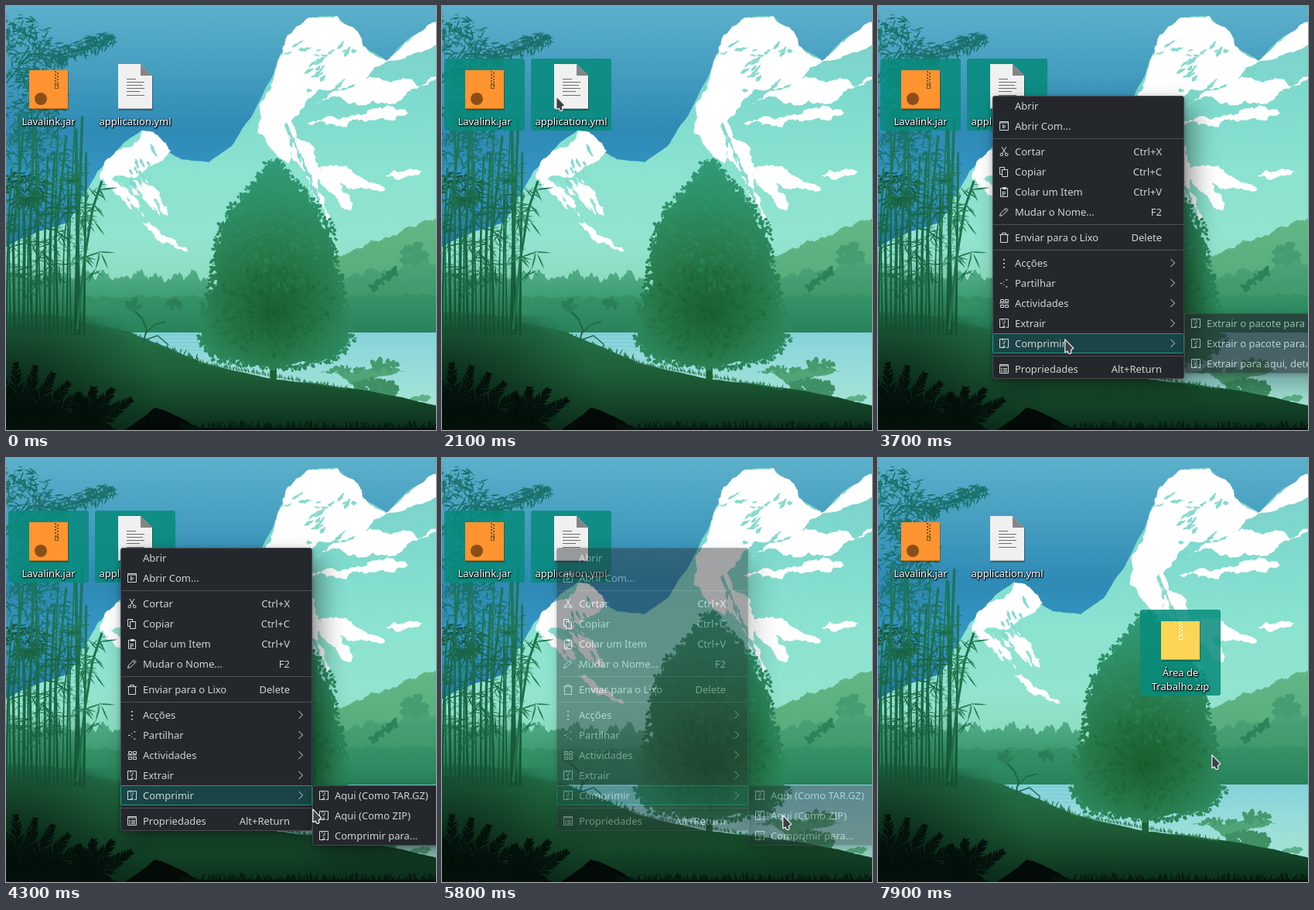
Animation, 556 px wide and 548 px high, one loop 8000 ms. Source, as an HTML page with a canvas:

```html
<!DOCTYPE html>
<html lang="pt">
<head>
<meta charset="utf-8">
<title>Desktop</title>
<style>
html, body { margin: 0; width: 100%; height: 100%; overflow: hidden; background: #10402a; }
#stage { position: absolute; left: 0; top: 0; width: 556px; height: 548px; overflow: hidden;
  font: 13px/18px "Noto Sans", "Open Sans", sans-serif; }
#stage * { position: absolute; box-sizing: border-box; white-space: pre; }
#stage svg * { position: static; }
canvas, svg, #zip, #menus { left: 0; top: 0; }
.sel { width: 104px; height: 93px; background: rgba(7, 139, 124, .86); border-radius: 3px; }
.label { width: 120px; text-align: center; color: #fff;
  text-shadow: 1px 1px 1px #000, 0 1px 2px #000, 0 0 3px rgba(0,0,0,.6); }
#band { background: rgba(20, 155, 138, .3); border: 1px solid #18a090; }
.menu { background: #24282d; border: 1px solid #454a4e; border-radius: 3px; color: #d0d3d5;
  box-shadow: 12px 16px 32px rgba(0,0,0,.42), 0 2px 6px rgba(0,0,0,.3); }
.row { left: -1px; right: -1px; height: 26px; border: 1px solid transparent; border-radius: 3px; }
.row.on { background: #1a4445; border-color: #1c9a8b; }
.row span { left: 28px; top: 3px; }
.row .key { left: auto; right: 28px; }
.row svg { left: 6px; top: 4px; }
.row .more { left: auto; right: 6px; }
.rule { left: 0; right: 0; height: 1px; background: #4c5155; }
</style>
</head>
<body>
<div id="stage">
  <canvas id="view" width="556" height="548"></canvas>
  <div class="sel" id="selA" style="left:3px;top:68px"></div>
  <div class="sel" id="selB" style="left:115px;top:68px"></div>
  <svg width="556" height="548">
    <rect x="31" y="84" width="50" height="51" opacity=".25"/>
    <rect x="30" y="83" width="50" height="50" fill="#ff9430"/>
    <path d="M30 132.5h50" stroke="#c9701c"/>
    <path d="M64 84v18M67 86v18" stroke="#80501f" stroke-width="2" stroke-dasharray="2 2"/>
    <rect x="63.5" y="101.5" width="4" height="5" fill="none" stroke="#80501f"/>
    <circle cx="45" cy="120" r="8" fill="#8a4f19"/>
    <path d="M146 76h29l15 15v44h-44z" opacity=".3"/>
    <path d="M145 75h29l15 15v43h-44z" fill="#f0f0f0"/>
    <path d="M174 75l15 15h-15z" fill="#858585"/>
    <path d="M145 132.5h44" stroke="#b9b9b9"/>
    <path d="M156 94.5h12m-12 4h23m-23 4h21m-21 4h23m-23 4h17m-17 5h23" stroke="#6d6d6d"/>
  </svg>
  <div class="label" style="left:-5px;top:140px">Lavalink.jar</div>
  <div class="label" style="left:107px;top:140px">application.yml</div>
  <div id="zip">
    <div class="sel" style="left:339px;top:196px;height:111px"></div>
    <svg width="556" height="548">
      <rect x="367" y="212" width="50" height="51" opacity=".25"/>
      <rect x="366" y="211" width="50" height="50" fill="#fcd557"/>
      <path d="M366 260.5h50" stroke="#cba53c"/>
      <path d="M390 212v18M393 214v16" stroke="#fff6d8" stroke-width="2" stroke-dasharray="2 2"/>
      <rect x="389.5" y="229.5" width="4" height="5" fill="none" stroke="#fff6d8"/>
    </svg>
    <div class="label" style="left:331px;top:268px">Área de
Trabalho.zip</div>
  </div>
  <div id="band"></div>
  <div id="menus"></div>
  <svg id="cursor" width="16" height="24">
    <path d="M.8.8V17.6L4.3 16.2Q5 20.3 8 19.2Q9.6 18.2 8.3 14.8L11.8 12.2Z"
      fill="#3b4146" stroke="#f4f4f4" stroke-width="1.2" stroke-linejoin="round"/>
  </svg>
</div>
<script>
const $ = id => document.getElementById(id);
const c = $('view').getContext('2d');

// ---------- drawing helpers ----------
let seed = 11;
const rnd = () => (seed = (seed * 16807) % 2147483647) / 2147483647;
const span = (a, b) => a + (b - a) * rnd();
const times = (n, f) => { for (let i = 0; i < n; i++) f(i); };

function grad(y0, y1, ...cols) {
  const g = c.createLinearGradient(0, y0, 0, y1);
  cols.forEach((k, i) => g.addColorStop(i / (cols.length - 1), k));
  return g;
}

// Fractal edge between two points
function edge(x0, y0, x1, y1, amp) {
  const dx = x1 - x0, dy = y1 - y0;
  if (Math.hypot(dx, dy) < 3.5) return c.lineTo(x1, y1);
  const k = span(-amp, amp), mx = (x0 + x1) / 2 - dy * k, my = (y0 + y1) / 2 + dx * k;
  edge(x0, y0, mx, my, amp);
  edge(mx, my, x1, y1, amp);
}

function shape(p, color, amp = .03) {
  c.fillStyle = color;
  c.beginPath();
  c.moveTo(p[0], p[1]);
  for (let i = 2; i < p.length; i += 2) edge(p[i - 2], p[i - 1], p[i], p[i + 1], amp);
  edge(p[p.length - 2], p[p.length - 1], p[0], p[1], amp);
  c.fill();
}

// Ragged sliver from one point to another
function shard(x0, y0, x1, y1, w, color = '#fff') {
  const d = Math.hypot(x1 - x0, y1 - y0), nx = (y0 - y1) / d * w, ny = (x1 - x0) / d * w;
  const at = (k, s) => [x0 + (x1 - x0) * k + nx * s, y0 + (y1 - y0) * k + ny * s];
  shape([x0, y0, ...at(.3, 1), ...at(.7, .6), x1, y1, ...at(.6, -.6), ...at(.25, -.9)], color, .22);
}

// Tree line between two heights, filled down to a floor
function ridge(x0, y0, x1, y1, floor, color, bump) {
  c.fillStyle = color;
  c.beginPath();
  c.moveTo(x0, floor);
  for (let x = x0; x <= x1; x += 2) {
    const crown = Math.abs(Math.sin(x * .19) + Math.sin(x * .083)) / 2;
    c.lineTo(x, y0 + (y1 - y0) * (x - x0) / (x1 - x0) - bump * (crown + rnd() * .45));
  }
  c.lineTo(x1, floor);
  c.fill();
}

function leaf(x, y, a, len, w) {
  c.save();
  c.translate(x, y);
  c.rotate(a);
  c.beginPath();
  c.moveTo(0, 0);
  c.quadraticCurveTo(len * .4, -w, len, 0);
  c.quadraticCurveTo(len * .4, w, 0, 0);
  c.fill();
  c.restore();
}

// Scatter inside an ellipse: round leaves, or blades when long > 0
function clump(n, x, y, rx, ry, size, color, long = 0) {
  c.fillStyle = color;
  times(n, () => {
    const a = span(0, 6.283), r = Math.sqrt(rnd()), s = span(.5, 1.4) * size;
    const u = x + Math.cos(a) * r * rx, v = y + Math.sin(a) * r * ry;
    if (long) return leaf(u, v, span(-.3, 3.4), s * long, s * .5);
    c.beginPath();
    c.ellipse(u, v, s, s * .65, a, 0, 7);
    c.fill();
  });
}

function line(color, w, ...p) {
  c.strokeStyle = color;
  c.lineWidth = w;
  c.beginPath();
  for (let i = 0; i < p.length; i += 2) c.lineTo(p[i], p[i + 1]);
  c.stroke();
}

function grass(x0, x1, ground, color, h) {
  c.fillStyle = color;
  for (let x = x0; x < x1; x += 1.8) leaf(x, ground(x), -1.57 + span(-.6, .6), span(h / 3, h), 1.5);
}

// ---------- landscape ----------
function sky() {
  c.fillStyle = grad(0, 320, '#5cb0cb', '#469ec0', '#2f8ab5', '#3598c8', '#1c70b2');
  c.fillRect(0, 0, 556, 340);
}

function mountains() {
  const mint = grad(20, 400, '#7ccfcb', '#7edacd', '#8ae2d0', '#92e4cf', '#86d6b4'), rock = '#86dacd';
  shape([-20, 322, 80, 280, 118, 214, 152, 177, 176, 160, 226, 198, 262, 202, 292, 181, 318, 142, 344, 92, 368, 36,
    404, 13, 428, 13, 462, 52, 492, 71, 526, 38, 580, 5, 580, 430, -20, 430], mint, .04);

  shape([372, 31, 404, 15, 428, 13, 462, 52, 492, 72, 466, 93, 440, 106, 404, 108, 386, 130, 368, 150, 376, 180, 366, 205,
    340, 181, 326, 164, 345, 96, 358, 62], '#fff', .16);
  shape([490, 72, 526, 40, 570, 12, 570, 40, 524, 63], '#fff', .12);
  shard(400, 128, 575, 88, 13);
  shard(385, 152, 520, 138, 7);
  shard(366, 148, 418, 278, 14);
  shard(400, 207, 490, 238, 11);
  shard(405, 210, 446, 264, 10);
  shard(491, 219, 538, 214, 7);
  times(22, () => {
    const x = span(358, 446), y = span(50, 118);
    shard(x, y, x + span(6, 20), y - span(-2, 16), span(1, 3), rock);
  });
  times(12, i => {
    const x = 362 + i * 3.5, y = 150 + i * 8;
    shard(x, y, x + span(4, 9), y + span(14, 26), span(1, 3), rock);
  });

  shape([176, 161, 213, 187, 190, 206, 166, 222, 121, 224, 140, 192], '#fff', .16);
  times(8, i => {
    const x = 124 + i * 8, y = span(212, 238);
    shard(x, y, x + span(22, 46), y + span(26, 52), span(3, 6));
  });
  shard(176, 280, 236, 317, 5);
  times(12, () => {
    const x = span(140, 188), y = span(176, 226);
    shard(x, y, x + span(4, 10), y + span(8, 18), 2, rock);
  });
}

function hills() {
  ridge(410, 334, 558, 276, 430, grad(280, 400, '#62b685', '#52a878'), 5);
  clump(80, 530, 324, 18, 16, 4, '#469d72');
  ridge(0, 355, 262, 358, 430, grad(340, 425, '#52ae88', '#3b9a70', '#2a875c'), 13);
  ridge(400, 360, 558, 336, 430, grad(335, 428, '#4aa276', '#3d9869', '#2c8655'), 9);
  ridge(100, 379, 558, 376, 425, grad(370, 425, '#379468', '#27825a'), 4);
  c.fillStyle = grad(420, 515, '#84d2da', '#97dcda', '#a4e4d4');
  c.fillRect(140, 422, 416, 100);
  c.fillStyle = 'rgba(105,190,200,.4)';
  times(5, i => c.fillRect(165 + i * 17 % 40, 424 + i * 5, 80, 1.5));
  shard(405, 474, 516, 473, 8, '#4fa577');
  clump(40, 488, 464, 18, 7, 3, '#459a6e');
  clump(30, 442, 470, 22, 4, 3, '#479c70');
  shard(492, 511, 550, 506, 5, '#5eb08a');
  clump(140, 478, 496, 28, 14, 4, '#3f9065');
}

function ground() {
  shape([-20, 396, 60, 398, 160, 421, 255, 461, 345, 482, 460, 496, 580, 520, 580, 570, -20, 570],
    grad(395, 545, '#237050', '#236c42', '#1f6039', '#164a2b', '#0c301c'), .02);
  const shade = c.createRadialGradient(0, 548, 20, 0, 548, 210);
  shade.addColorStop(0, 'rgba(2,16,9,.9)');
  shade.addColorStop(1, 'rgba(8,40,24,0)');
  c.fillStyle = shade;
  c.fillRect(0, 400, 220, 148);
  grass(90, 250, x => 406 + (x - 90) * .34, '#247049', 12);
  grass(250, 440, x => 463 + (x - 250) * .18, '#2a7a4c', 9);
}

function bigTree() {
  const tint = c.createRadialGradient(345, 395, 10, 345, 365, 175);
  ['#1c6233', '#237242', '#2a8356', '#2f926a', '#339c7c'].forEach((k, i) => tint.addColorStop(i / 4, k));
  shape([341, 440, 351, 440, 350, 485, 341, 485], '#1c6034');
  // half width of the crown at each height
  const crown = [[206, 4], [232, 26], [262, 52], [292, 70], [340, 76], [385, 86], [430, 96], [456, 72], [464, 20]];
  const side = s => crown.map(([y, w]) => [348 + s * w, y]);
  const rim = [...side(1), ...side(-1).reverse()];
  shape(rim.flat(), tint, .13);
  rim.forEach(([x, y], i) => {
    const [u, v] = rim[(i + 1) % rim.length];
    times(4, j => clump(16, x + (u - x) * j / 4, y + (v - y) * j / 4, span(6, 12), span(4, 9), 2.4, tint));
  });
  clump(220, 345, 300, 62, 72, 3, 'rgba(56,166,122,.15)');
  clump(260, 345, 395, 82, 60, 3, 'rgba(15,80,42,.15)');
  clump(30, 428, 356, 9, 14, 3, '#2b8459');
  times(4, i => clump(10, 476 + i * 8, 362 - i * 6, 6, 5, 3, '#2b8459'));
}

function bamboo() {
  const g = grad(20, 420, '#19706a', '#1c7463', '#1f7555', '#186645', '#134e2d');
  c.fillStyle = grad(330, 425, 'rgba(28,98,62,0)', 'rgba(28,98,62,.8)');
  c.fillRect(0, 330, 100, 80);
  clump(900, 40, 260, 66, 120, 3, 'rgba(36,128,94,.5)', 3);
  times(12, i => clump(70, span(8, 50), 24 + i * 14, 34, 16, 3.2, g, 3));
  times(5, i => clump(60, 60 + i * 17, 66 - i * 6, 16, 9, 3, g, 3));
  clump(130, 18, 236, 32, 22, 3.4, '#144f38', 3);
  clump(260, 58, 225, 46, 46, 3, g, 3);
  line('#19706a', 2, 0, 100, 30, 62, 70, 64, 140, 40);
  times(19, i => {
    const x = i * 5.6;
    line(g, span(1.5, 4), x, 425, x + span(-3, 3), 300, x + span(-4, 12), span(130, 250));
  });
  line('#1f7048', 3, 92, 418, 101, 330, 112, 262, 124, 226);
  times(60, () => {
    const x = span(2, 126), y = span(218, 375 - x * .2);
    clump(5, x, y, 5, 4, 3, x > 80 ? '#24784f' : '#1b6744', 6);
  });
  const twig = '#1f6646';
  line(twig, 2, 176, 440, 182, 418, 176, 404, 166, 394);
  line(twig, 1.5, 180, 424, 192, 412, 206, 408);
  line(twig, 1.5, 178, 432, 196, 426, 210, 438);
  clump(24, 165, 387, 10, 6, 3, '#2a7f58');
  clump(24, 218, 385, 11, 6, 3, '#2a7f58');
}

// Fern: side leaves shrinking toward the tip
function frond(x, y, a, len) {
  const dx = Math.cos(a), dy = Math.sin(a);
  line(c.fillStyle, 2, x, y, x + dx * len, y + dy * len);
  for (let k = .1; k < 1; k += .06) for (const s of [-1, 1])
    leaf(x + dx * len * k, y + dy * len * k, a + s * span(.5, .9), 21 * (1.25 - k), 3.2);
}

function foreground() {
  const dark = '#04110b';
  shape([-10, 512, 90, 526, 165, 560, -10, 560], dark, .08);
  shape([152, 550, 192, 519, 260, 550], '#030a07', .04);
  c.fillStyle = dark;
  times(6, i => frond(10 + i * 6, 545, -1.85 + i * .24, 88 - i * 3));
  times(4, i => frond(100, 548, -1.7 + i * .38, 48 + i * 9));
  c.fillRect(235, 545, 321, 3);
  grass(225, 556, () => 548, '#06190f', 14);
}

[sky, mountains, hills, ground, bigTree, bamboo, foreground].forEach(f => f());

// ---------- menus ----------
const box = (x, y, w, h) => `M${x}.5 ${y}.5h${w}v${h}h-${w}z`;
const ring = x => `M${x} 12a1.7 1.7 0 1 0 3.4 0a1.7 1.7 0 1 0-3.4 0`;
const art = {
  open: box(2, 2, 11, 11) + 'M2 4h11M6.500 6.500L10 8.700L6.500 11z',
  cut: 'M5 2l5.500 9M11 2l-5.500 9' + ring(3) + ring(9.6),
  copy: 'M5 11.500H2.500v-9h6V5' + box(5, 5, 7, 9),
  paste: box(3, 3, 9, 11) + box(6, 2, 4, 2) + 'M5 8.500h5m-5 2h5m-5 2h3',
  edit: 'M2.500 13.500l1-3.500l7-7l2.500 2.500l-7 7zM9 4.500l2.500 2.500',
  trash: 'M2 4.500h12M5.500 4v-1.500h5V4' + box(3, 4, 9, 10),
  dots: 'M7 3.500h2m-2 5h2m-2 5h2M7 4h2m-2 5h2m-2 5h2',
  share: 'M3 8.500h2.500M10 4h2.500M10 13h2.500M7 6.500h1M7 10.500h1',
  act: box(3, 3, 4, 3) + box(9, 3, 4, 3) + 'M2 8h12' + box(3, 10, 4, 3) + box(9, 10, 4, 3),
  pack: 'M8 13.500H2.500v-11h11v11H11M6 3v2m3-1v3M6 8h3M8 10v4l-2-2m2 2l2-2',
  prop: box(2, 2, 11, 11) + 'M2 4h11M4 7.500h2m1 0h5m-8 2h2m1 0h5m-8 2h2m1 0h5'
};
const icon = (d, cls = '') => `<svg class="${cls}" width="16" height="16"><path d="${d}" fill="none" stroke="#d6d9db"/></svg>`;

// Rows are 26 px apart, a '-' adds a rule; mid is the first row's centre
function menu(x, mid, width, ...rows) {
  const top = mid - 13, el = document.createElement('div');
  for (const [text, pic, key] of rows) {
    if (text === '-') {
      el.innerHTML += `<div class="rule" style="top:${mid - 11 - top}px"></div>`;
      mid += 7;
      continue;
    }
    const end = key === '>' ? icon('M5.500 3l5 5l-5 5', 'more') : `<span class="key">${key || ''}</span>`;
    el.innerHTML += `<div class="row" data-mid="${mid}" style="top:${mid - 14 - top}px">` +
      `${pic ? icon(art[pic]) : ''}<span>${text}</span>${end}</div>`;
    mid += 26;
  }
  el.className = 'menu';
  el.style.cssText = `left:${x}px;top:${top}px;width:${width}px;height:${mid - 13 - top}px`;
  $('menus').append(el);
  return el;
}

const main = menu(148, 129, 248,
  ['Abrir'], ['Abrir Com...', 'open'], '-',
  ['Cortar', 'cut', 'Ctrl+X'], ['Copiar', 'copy', 'Ctrl+C'],
  ['Colar um Item', 'paste', 'Ctrl+V'], ['Mudar o Nome...', 'edit', 'F2'], '-',
  ['Enviar para o Lixo', 'trash', 'Delete'], '-',
  ['Acções', 'dots', '>'], ['Partilhar', 'share', '>'], ['Actividades', 'act', '>'],
  ['Extrair', 'pack', '>'], ['Comprimir', 'pack', '>'], '-',
  ['Propriedades', 'prop', 'Alt+Return']);
const extract = menu(396, 410, 270,
  ['Extrair o pacote para aqui', 'pack'], ['Extrair o pacote para...', 'pack'],
  ['Extrair para aqui, detectar a subpasta', 'pack']);
const compress = menu(396, 436, 172,
  ['Aqui (Como TAR.GZ)', 'pack'], ['Aqui (Como ZIP)', 'pack'], ['Comprimir para...', 'pack']);

// ---------- timeline ----------
const ramp = (t, a, b) => Math.min(1, Math.max(0, (t - a) / (b - a)));

// Pointer moves: begin, end, x, y
const moves = [[200, 700, 180, 288], [900, 1400, 46, 101], [1700, 2100, 147, 116], [3400, 3700, 241, 430],
  [3800, 4800, 447, 460], [5100, 5200, 440, 461], [6400, 6500, 426, 453], [7600, 7700, 527, 415], [7700, 7900, 431, 383]];

function pointer(t) {
  let x = 2, y = 40;
  for (const [a, b, u, v] of moves) {
    const k = 1 - (1 - ramp(t, a, b)) ** 2;
    x += (u - x) * k;
    y += (v - y) * k;
  }
  return [Math.round(x), Math.round(y)];
}

const show = (el, on) => el.style.visibility = on ? 'visible' : 'hidden';
const mark = (el, y) => el.querySelectorAll('.row').forEach(r =>
  r.classList.toggle('on', Math.abs(r.dataset.mid - y) < 13));

function draw(t) {
  const [x, y] = pointer(t), picked = t >= 1200 && t < 7700;
  show($('cursor'), t >= 200);
  $('cursor').style.transform = `translate(${x}px,${y}px)`;

  const band = $('band').style;
  show($('band'), t >= 1000 && t < 1800);
  band.left = x + 'px';
  band.top = y + 'px';
  band.width = 216 - x + 'px';
  band.height = 265 - y + 'px';

  show($('selA'), picked && (t > 1800 || x < 107));
  show($('selB'), picked);
  show($('zip'), t >= 7700);

  const close = 1 - ramp(t, 5600, 5950);
  main.style.opacity = t < 3300 ? 0 : close;
  extract.style.opacity = t < 3600 ? 0 : 1 - ramp(t, 3600, 3900);
  compress.style.opacity = t < 5700 ? ramp(t, 3800, 4000) : close;
  mark(main, t < 3500 ? 0 : Math.min(y, 436));
  mark(compress, x > 396 && t < 5700 ? y : 0);
}

const start = performance.now();
function tick() {
  const t = (performance.now() - start) % 8000;
  draw(Math.floor(t / 100) * 100);
  requestAnimationFrame(tick);
}
tick();
</script>
</body>
</html>
```
